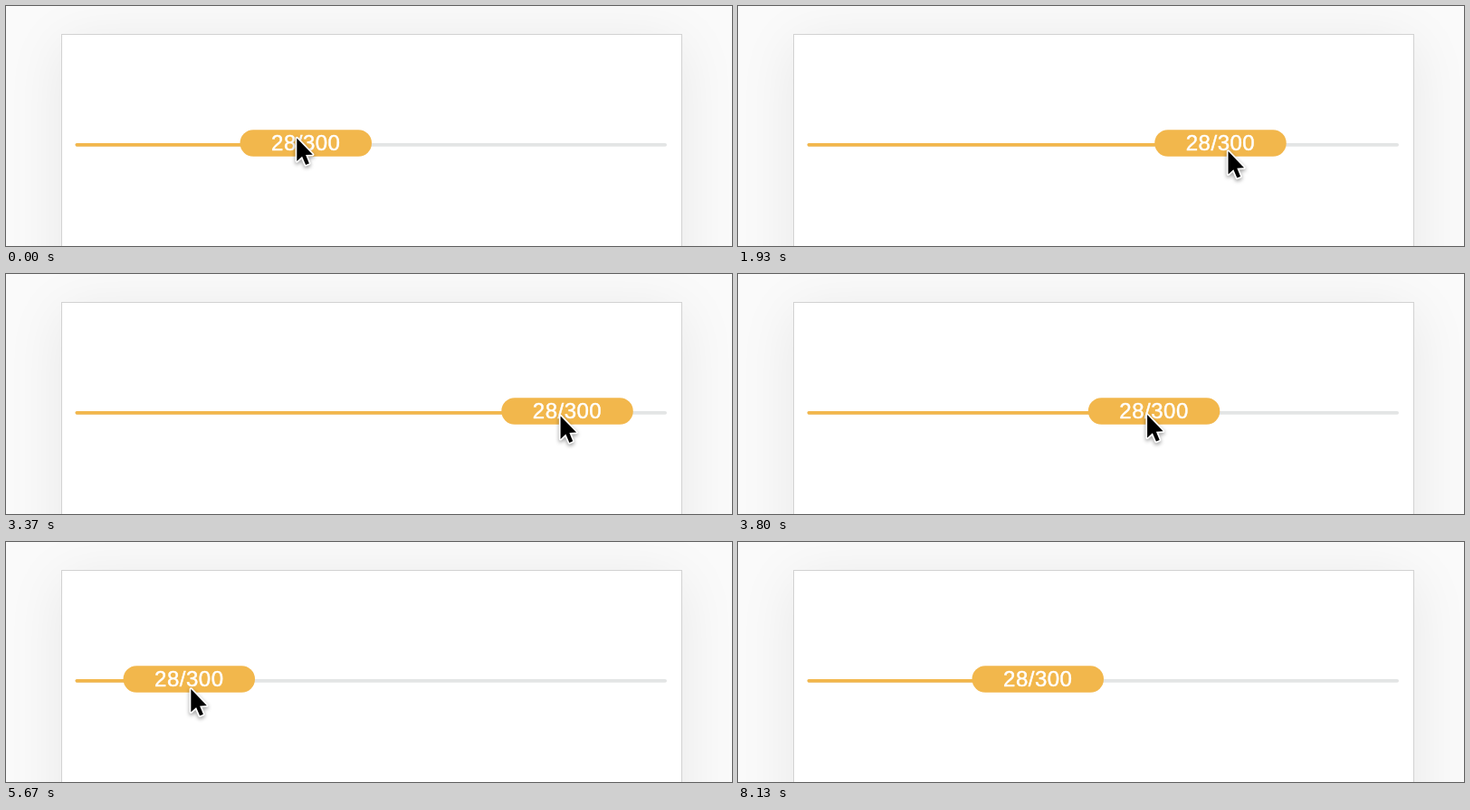
Write an HTML page with a canvas that moves like this. It is 802 px wide and 266 px high and loops after 8.76 s.

```html
<!DOCTYPE html>
<html lang="en">
<head>
<meta charset="utf-8">
<title>Slider drag</title>
<style>
  html, body { margin: 0; width: 100%; height: 100%; overflow: hidden; background: #fafafa; }
  canvas { display: block; width: 802px; height: 266px; }
</style>
</head>
<body>
<canvas id="stage"></canvas>
<script>
const W = 802, H = 266, LOOP = 8760;
const AMBER = '#f2b74c', GREY = '#e3e5e5';
const MIN = 76.5, MAX = 584.5, PILL_W = 145.5, TRACK_END = 730;
const HIDE_AT = 8120;
const HOME = { x: 320, y: 144.5 };

// Pointer moves; between them it rests. A move with grab drags the pill,
// arc bends the path, skew delays the easing.
const moves = [
  { from: 30, to: 630, x: 338.5, y: 148 },
  { from: 770, to: 2400, x: 696, y: 158, arc: 5, skew: 1.8, grab: 80 },
  { from: 2690, to: 2950, x: 648.5, y: 160 },
  { from: 2950, to: 4560, x: 140.5, y: 162, arc: -7, grab: 64 },
  { from: 4560, to: 4600, x: 144, y: 162 },
  { from: 5000, to: 6400, x: 332, y: 160, grab: 73.5 },
  { from: 6870, to: 7630, x: 376, y: 180, arc: 20 },
  { from: 7980, to: HIDE_AT, x: 780, y: -20 }
];

const clamp = (v, lo, hi) => Math.min(hi, Math.max(lo, v));
const mix = (a, b, u) => a + (b - a) * u;
const smooth = u => u * u * (3 - 2 * u);

function pose(t) {
  let { x, y } = HOME, pill = 258.5;
  for (const m of moves) {
    if (t < m.from) break;
    const u = clamp((t - m.from) / (m.to - m.from), 0, 1);
    x = mix(x, m.x, smooth(u ** (m.skew || 1.34)));
    y = mix(y, m.y, u) + (m.arc || 0) * Math.sin(Math.PI * u);
    if (m.grab) pill = clamp(x - m.grab, MIN, MAX);
  }
  return { x, y, pill };
}

const canvas = document.getElementById('stage');
const ctx = canvas.getContext('2d');
const scale = window.devicePixelRatio || 1;
canvas.width = W * scale;
canvas.height = H * scale;

function shadow(color, blur, y) {
  ctx.shadowColor = color;
  ctx.shadowBlur = blur * scale;
  ctx.shadowOffsetY = y * scale;
}

function bar(x, y, w, h, color) {
  ctx.fillStyle = color;
  ctx.beginPath();
  ctx.roundRect(x, y, w, h, h / 2);
  ctx.fill();
}

function drawPanel() {
  ctx.fillStyle = '#fafafa';
  ctx.fillRect(0, 0, W, H);
  ctx.save();
  shadow('rgba(0,0,0,.08)', 60, 10);
  ctx.fillStyle = '#fff';
  ctx.fillRect(61, 31, 686, 500);
  ctx.restore();
  ctx.strokeStyle = '#d2d2d2';
  ctx.lineWidth = 1;
  ctx.strokeRect(61.5, 31.5, 685, 500);
}

function drawSlider(x) {
  bar(MIN, 152, TRACK_END - MIN, 3.7, GREY);
  bar(MIN, 152, x - MIN + 20, 3.7, AMBER);
  bar(x, 137.3, PILL_W, 29.4, AMBER);
  ctx.fillStyle = ctx.strokeStyle = '#fff';
  ctx.font = '24px "Liberation Sans", Helvetica, Arial, sans-serif';
  ctx.letterSpacing = '0.5px';
  ctx.textAlign = 'center';
  ctx.lineWidth = 0.5;
  const mid = x + PILL_W / 2;
  ctx.fillText('28/300', mid, 159.5);
  ctx.strokeText('28/300', mid, 159.5);
}

const arrow = new Path2D('M0 0V25.5L5.8 20.2L9.8 29.5L13.6 27.9L9.8 18.6L17.5 18.2Z');

function drawPointer(x, y) {
  ctx.save();
  ctx.translate(x + 1.3, y + 2);
  ctx.lineJoin = 'round';
  ctx.lineWidth = 3.4;
  ctx.strokeStyle = '#fff';
  shadow('rgba(0,0,0,.4)', 4, 2);
  ctx.stroke(arrow);
  shadow('transparent', 0, 0);
  ctx.fillStyle = '#000';
  ctx.fill(arrow);
  ctx.restore();
}

function draw(t) {
  const { x, y, pill } = pose(t);
  ctx.setTransform(scale, 0, 0, scale, 0, 0);
  drawPanel();
  drawSlider(pill);
  if (t < HIDE_AT) drawPointer(x, y);
}

const start = performance.now();
function tick() {
  draw((performance.now() - start) % LOOP);
  requestAnimationFrame(tick);
}
tick();
</script>
</body>
</html>
```
